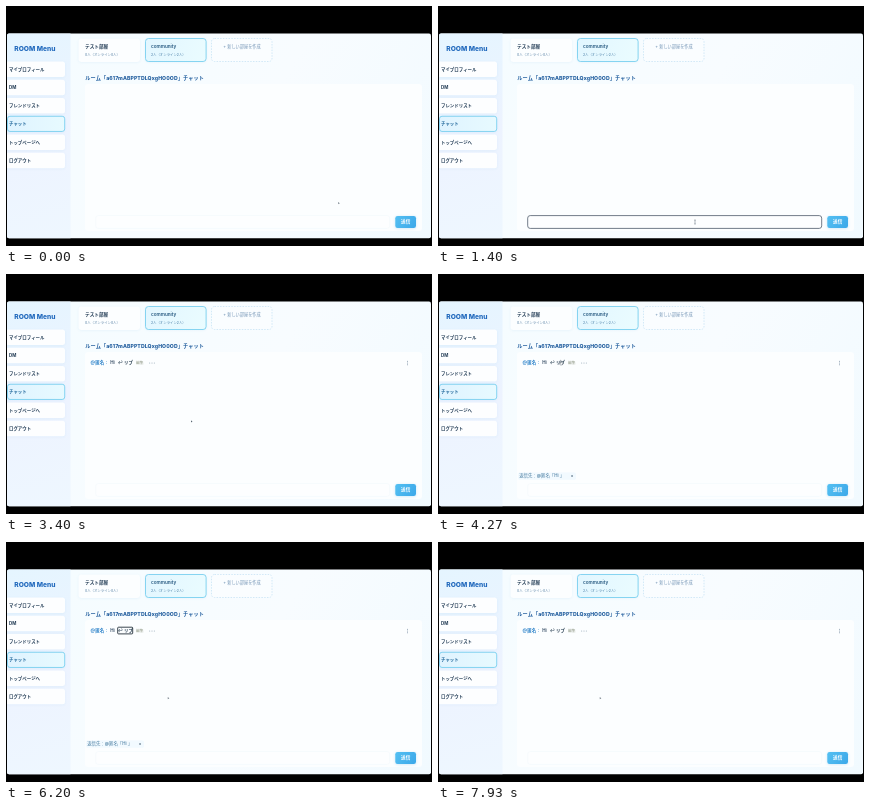
Animation of 426x240 px, one loop 8 s. Source, as an HTML page with a canvas:

```html
<!DOCTYPE html>
<html lang="ja">
<head>
<meta charset="utf-8">
<title>Room chat</title>
<style>
html, body { margin: 0; width: 100%; height: 100%; overflow: hidden; background: #000; }
canvas { display: block; width: 426px; height: 240px; }
</style>
</head>
<body>
<canvas id="stage"></canvas>
<script>
const W = 426, H = 240, LOOP = 8000;
const canvas = document.getElementById('stage');
const ctx = canvas.getContext('2d');
const ratio = window.devicePixelRatio || 1;
canvas.width = W * ratio;
canvas.height = H * ratio;

const FONT = 'Inter, "Noto Sans CJK JP", "Noto Sans CJK", sans-serif';
const INK = '#263f58', BLUE = '#2169bd', SKY = '#6ccbee';
const MENU = ['マイプロフィール', 'DM', 'フレンドリスト', 'チャット', 'トップページへ', 'ログアウト'];

// Pointer stops: time, x, y
const PATH = [
  [0, 333, 197], [250, 333, 197], [1000, 257, 216], [1700, 257, 216],
  [2300, 261, 218], [2950, 261, 218], [3800, 123, 88.5], [4450, 123, 88.5],
  [5150, 162.5, 156], [LOOP, 162.5, 156]
];

function text(str, x, y, size, color, weight = 400, align = 'left', spacing = 0) {
  ctx.font = `${weight} ${size}px ${FONT}`;
  ctx.letterSpacing = `${spacing}px`;
  ctx.textAlign = align;
  ctx.textBaseline = 'middle';
  ctx.fillStyle = color;
  ctx.fillText(str, x, y);
}

function box(x, y, w, h, r, fill, stroke, line = 0.6, dash = []) {
  ctx.beginPath();
  ctx.roundRect(x, y, w, h, r);
  if (fill) {
    ctx.fillStyle = fill;
    ctx.fill();
  }
  if (stroke) {
    ctx.strokeStyle = stroke;
    ctx.lineWidth = line;
    ctx.setLineDash(dash);
    ctx.stroke();
    ctx.setLineDash([]);
  }
}

function gradient(x0, y0, x1, y1, ...colors) {
  const g = ctx.createLinearGradient(x0, y0, x1, y1);
  colors.forEach((c, i) => g.addColorStop(i / (colors.length - 1), c));
  return g;
}

function shadow(draw, blur = 2.5, color = 'rgba(80,160,220,.11)') {
  ctx.save();
  ctx.shadowColor = color;
  ctx.shadowBlur = blur * ratio;
  ctx.shadowOffsetY = 0.5 * ratio;
  draw();
  ctx.restore();
}

function dots(x, y, dx, dy, color) {
  ctx.fillStyle = color;
  for (let i = -1; i <= 1; i++) {
    ctx.beginPath();
    ctx.arc(x + i * dx, y + i * dy, 0.5, 0, Math.PI * 2);
    ctx.fill();
  }
}

function sidebar() {
  ctx.fillStyle = gradient(1, 28, 64, 232, '#e5f5ff', '#edf3ff', '#eef7ff');
  ctx.fillRect(1, 27, 63.5, 206);
  text('ROOM Menu', 8.3, 43, 6.65, BLUE, 800);
  MENU.forEach((label, i) => {
    const y = 55.5 + i * 18.25, active = i === 3;
    const fill = active ? gradient(1, y, 59, y, '#dff3ff', '#e7faff') : '#fdfeff';
    shadow(() => box(0, y, 59, 15.6, 2.5, fill));
    if (active) box(1.5, y, 57.2, 15.2, 2.5, null, SKY, 0.8);
    text(label, 3, y + 7.9, 4.45, active ? '#20679b' : INK, 700);
  });
}

function rooms() {
  shadow(() => box(72.5, 32.5, 61.5, 23.5, 3, '#fcfeff'));
  text('テスト部屋', 79, 40.8, 4.65, INK, 700);
  text('0人（オンライン0人）', 79, 49.3, 3.4, '#5f87a8', 500);

  shadow(() => box(139.3, 32.5, 61, 23.3, 3, gradient(139, 32, 200, 56, '#e2f6ff', '#eafcff')));
  box(139.5, 32.5, 60.6, 23, 3, null, SKY, 0.8);
  text('community', 145, 41, 4.65, '#24577f', 600);
  text('2人（オンライン2人）', 145, 49.2, 3.4, '#5689ae', 500);

  box(205.5, 32.5, 60.5, 23, 3, '#fafdff', '#b9dcf1', 0.6, [1.5, 1.3]);
  text('+ 新しい部屋を作成', 236, 41.1, 4.2, '#7596b6', 500, 'center');
}

function message(ringed) {
  text('@匿名：', 84.6, 88.6, 4.5, '#2c82c9', 700);
  text('Hi', 104.2, 88.6, 4.5, INK, 600);
  text('↩ リプ', 119.3, 88.7, 4.4, '#293f52', 600, 'center');
  if (ringed) box(111.7, 85.2, 15, 6.7, 0.8, null, '#25313c', 0.9);
  text('編集', 130, 88.9, 3.8, '#8e9784', 500);
  dots(146, 88.9, 2.3, 0, '#8fa2b3');
  dots(401.5, 89, 0, 1.7, '#7f93a6');
}

function replyBar() {
  box(80, 198.4, 58, 7.4, 1.5, '#f2faff');
  text('返信先：@匿名「Hi 」', 81.2, 202.1, 4.4, '#457a9f', 500);
  text('×', 134, 202.1, 4, '#435d73', 600, 'center');
}

function form(t) {
  const focused = t >= 1050 && t < 2400;
  const sending = t >= 2400 && t < 2700;
  box(89.7, 209.6, 294, 12.8, 2.5, '#fdfeff', focused ? '#727c89' : '#f2f8fc', focused ? 1 : 0.6);

  const typed = t < 1800 ? '' : t < 2050 ? 'H' : t < 2700 ? 'Hi' : '';
  if (typed) text(typed, 94, 216.1, 4.4, sending ? '#a8b7c5' : INK);
  if (focused && t % 1000 >= 500) {
    ctx.font = `400 4.4px ${FONT}`;
    ctx.fillStyle = INK;
    ctx.fillRect(94.2 + ctx.measureText(typed).width, 213.6, 0.5, 5);
  }

  ctx.save();
  if (sending) ctx.globalAlpha = 0.6;
  shadow(() => box(389.3, 210, 20.7, 12, 2.3,
    gradient(389, 210, 410, 222, '#54c0f2', '#3ca8e9')), 3, 'rgba(50,160,225,.25)');
  text('送信', 399.7, 216, 4.6, '#fff', 800, 'center');
  ctx.restore();
}

function pointerAt(t) {
  const i = Math.max(1, PATH.findIndex(p => p[0] > t));
  const [t0, x0, y0] = PATH[i - 1], [t1, x1, y1] = PATH[i];
  const u = (t - t0) / (t1 - t0), e = u * u * (3 - 2 * u);
  return [x0 + (x1 - x0) * e, y0 + (y1 - y0) * e];
}

function pointer(t) {
  const [x, y] = pointerAt(t);
  ctx.save();
  ctx.translate(x, y);
  ctx.lineWidth = 0.5;
  ctx.strokeStyle = '#5f6b76';
  ctx.fillStyle = '#5b6873';
  ctx.beginPath();
  if (x > 90 && x < 384 && y > 209 && t < 2400) {
    ctx.moveTo(-0.8, -2);
    ctx.lineTo(0.8, -2);
    ctx.moveTo(0, -2);
    ctx.lineTo(0, 2);
    ctx.moveTo(-0.8, 2);
    ctx.lineTo(0.8, 2);
    ctx.stroke();
  } else if (x > 112 && x < 127 && y > 85 && y < 92) {
    ctx.roundRect(-1.3, -0.4, 3, 2.8, 0.8);
    ctx.roundRect(-0.8, -2.2, 0.9, 3, 0.4);
    ctx.fillStyle = '#fff';
    ctx.fill();
    ctx.stroke();
  } else {
    ctx.moveTo(-0.7, -1);
    ctx.lineTo(0.9, 0.5);
    ctx.lineTo(0.1, 0.6);
    ctx.lineTo(-0.7, 1.2);
    ctx.fill();
  }
  ctx.restore();
}

function draw(t) {
  ctx.setTransform(ratio, 0, 0, ratio, 0, 0);
  ctx.fillStyle = '#000';
  ctx.fillRect(0, 0, W, H);

  ctx.save();
  ctx.beginPath();
  ctx.roundRect(1, 27.5, 424, 204.7, 2);
  ctx.clip();
  ctx.fillStyle = gradient(64, 28, 425, 232, '#f5fcff', '#f8fcff', '#f1faff');
  ctx.fillRect(0, 27, W, 206);
  sidebar();
  rooms();
  text('ルーム「a617mABPPTDLQxgHO0OD」チャット', 79.2, 72.2, 5.15, '#235f9f', 800, 'left', 0.1);
  box(79, 78, 337, 147, 3, '#fcfeff');
  if (t >= 2700) message(t >= 4900 && t < 7400);
  if (t >= 4100 && t < 7400) replyBar();
  form(t);
  pointer(t);
  ctx.restore();
}

const start = performance.now();
function tick() {
  draw((performance.now() - start) % LOOP);
  requestAnimationFrame(tick);
}
tick();
</script>
</body>
</html>
```
